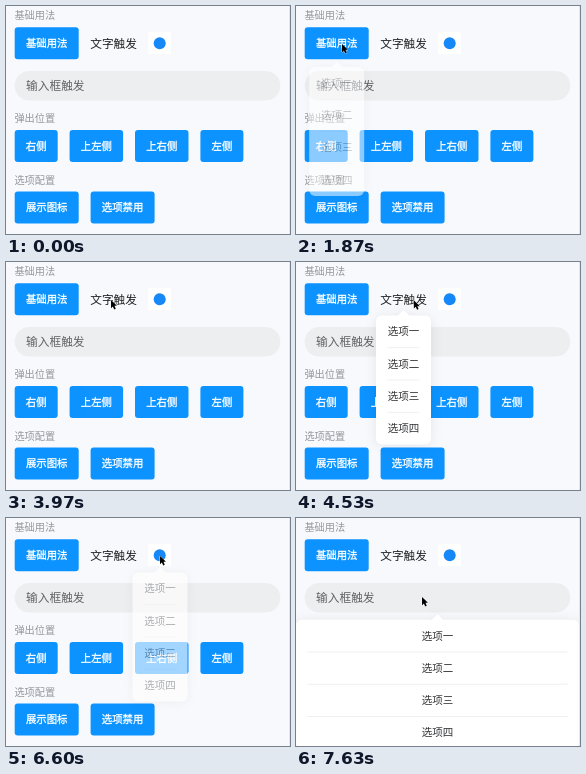
Recreate the animation shown at these times as an HTML page. Size 284 by 228 pixels, loop 8000 ms.

```html
<!DOCTYPE html>
<html lang="zh-CN">
<head>
<meta charset="utf-8">
<style>
  html, body { margin: 0; width: 100%; height: 100%; overflow: hidden; background: #f8f9fc; }
  svg { display: block; width: 284px; height: 228px; font-family: "Noto Sans CJK SC", "Noto Sans CJK", sans-serif; }
  .popover { filter: drop-shadow(0 1px 6px rgba(0, 0, 0, .08)); }
</style>
</head>
<body>
<svg id="stage" viewBox="0 0 284 228"></svg>
<script>
const LOOP = 8000;
const LEFT = 8.7;
const GAP = 11.9;
const ROW = 32.25;
const stage = document.getElementById('stage');

const label = (text, x, cy, fill, size = 10.5, extra = '') =>
  `<text x="${x}" y="${cy + size * .37}" font-size="${size}" fill="${fill}" ${extra}>${text}</text>`;

const rect = (x, y, w, h, r, fill) =>
  `<rect x="${x}" y="${y}" width="${w}" height="${h}" rx="${r}" fill="${fill}"/>`;

const heading = (text, cy) => label(text, 8.4, cy, '#93969b', 10.2);

// Buttons laid out from left to right, each as wide as its text needs.
function buttons(y, ...names) {
  let x = LEFT;
  return names.map(name => {
    const width = name.length * 10.5 + 22;
    const svg = rect(x, y, width, 32, 3, '#0d93ff') +
      label(name, x + width / 2, y + 15.8, '#fff', 10.4, 'text-anchor="middle" stroke="#fff" stroke-width=".3"');
    x += width + GAP;
    return svg;
  }).join('');
}

// A white menu of four options with an arrow on its top edge.
function popover({ cx, top, width = 55 }) {
  const left = cx - width / 2;
  const rows = [...'一二三四'].map((n, i) => {
    const y = top + ROW * i;
    return label('选项' + n, cx, y + 16, '#303133', 10.5, 'text-anchor="middle"') +
      (i ? rect(left + 11.5, y - .4, width - 23, .8, 0, '#e9ebee') : '');
  }).join('');
  return `<g class="popover">${rect(left, top, width, ROW * 4, 6, '#fff')}
    <path d="M${cx - 6} ${top + .5}l5 -5q1 -.8 2 0l5 5z" fill="#fff"/>
    <g class="rows">${rows}</g></g>`;
}

const menus = [
  { cx: 40.7, top: 61, open: 1800, close: 3165 },
  { cx: 107.5, top: 53.5, open: 3970, close: 5070 },
  { cx: 154, top: 54.5, open: 5690, close: 6560 },
  { cx: 141.5, top: 101.7, width: 283, open: 7180, close: LOOP },
];

const entry = { x: 281, y: 188 };
const moves = [
  { from: 610, to: 1170, x: 100.3, y: 48.3 },
  { from: 1170, to: 1500, x: 46, y: 38 },
  { from: 2290, to: 2770, x: 105, y: 38 },
  { from: 4350, to: 4870, x: 151, y: 39 },
  { from: 5250, to: 5400, x: 154, y: 38 },
  { from: 6650, to: 7030, x: 126, y: 79 },
];

stage.innerHTML =
  heading('基础用法', 9) + heading('弹出位置', 112) + heading('选项配置', 174) +
  buttons(21.3, '基础用法') +
  buttons(124, '右侧', '上左侧', '上右侧', '左侧') +
  buttons(185.4, '展示图标', '选项禁用') +
  label('文字触发', 84.2, 37.3, '#1f2022', 11.7) +
  rect(142, 26, 23, 22, 0, '#fff') + '<circle cx="153.7" cy="37.3" r="6" fill="#1688f8"/>' +
  rect(LEFT, 65, 265.6, 29.6, 14.8, '#edeef0') +
  label('输入框触发', 20.1, 79.5, '#606266', 11.7) +
  menus.map(popover).join('') +
  rect(283, 0, 1, 228, 0, '#e6e7ea') +
  '<path id="pointer" d="M0 0V9.6L2.2 7.6 3.8 11.2 5.6 10.4 4.1 6.9H7z" stroke="#fff" stroke-width=".8" paint-order="stroke"/>';

const layers = stage.querySelectorAll('.popover');
const rowLayers = stage.querySelectorAll('.rows');
const pointer = document.getElementById('pointer');
const progress = (t, from, to) => Math.min(1, Math.max(0, (t - from) / (to - from)));
const easeOut = p => 1 - (1 - p) ** 2;
const easeInOut = p => p * p * (3 - 2 * p);

function pointerAt(t) {
  let { x, y } = entry;
  for (const move of moves) {
    const p = easeInOut(progress(t, move.from, move.to));
    x += (move.x - x) * p;
    y += (move.y - y) * p;
  }
  return `${x} ${y}`;
}

function draw() {
  const t = performance.now() % LOOP;
  menus.forEach(({ open, close }, i) => {
    const shown = easeOut(progress(t, open, open + 230)) * (1 - easeOut(progress(t, close, close + 190)));
    // The rows fade on top of the panel's own fade.
    layers[i].setAttribute('opacity', shown);
    rowLayers[i].setAttribute('opacity', shown);
  });
  pointer.setAttribute('visibility', t < 630 ? 'hidden' : 'visible');
  pointer.setAttribute('transform', `translate(${pointerAt(t)}) scale(.85)`);
  requestAnimationFrame(draw);
}
draw();
</script>
</body>
</html>
```
